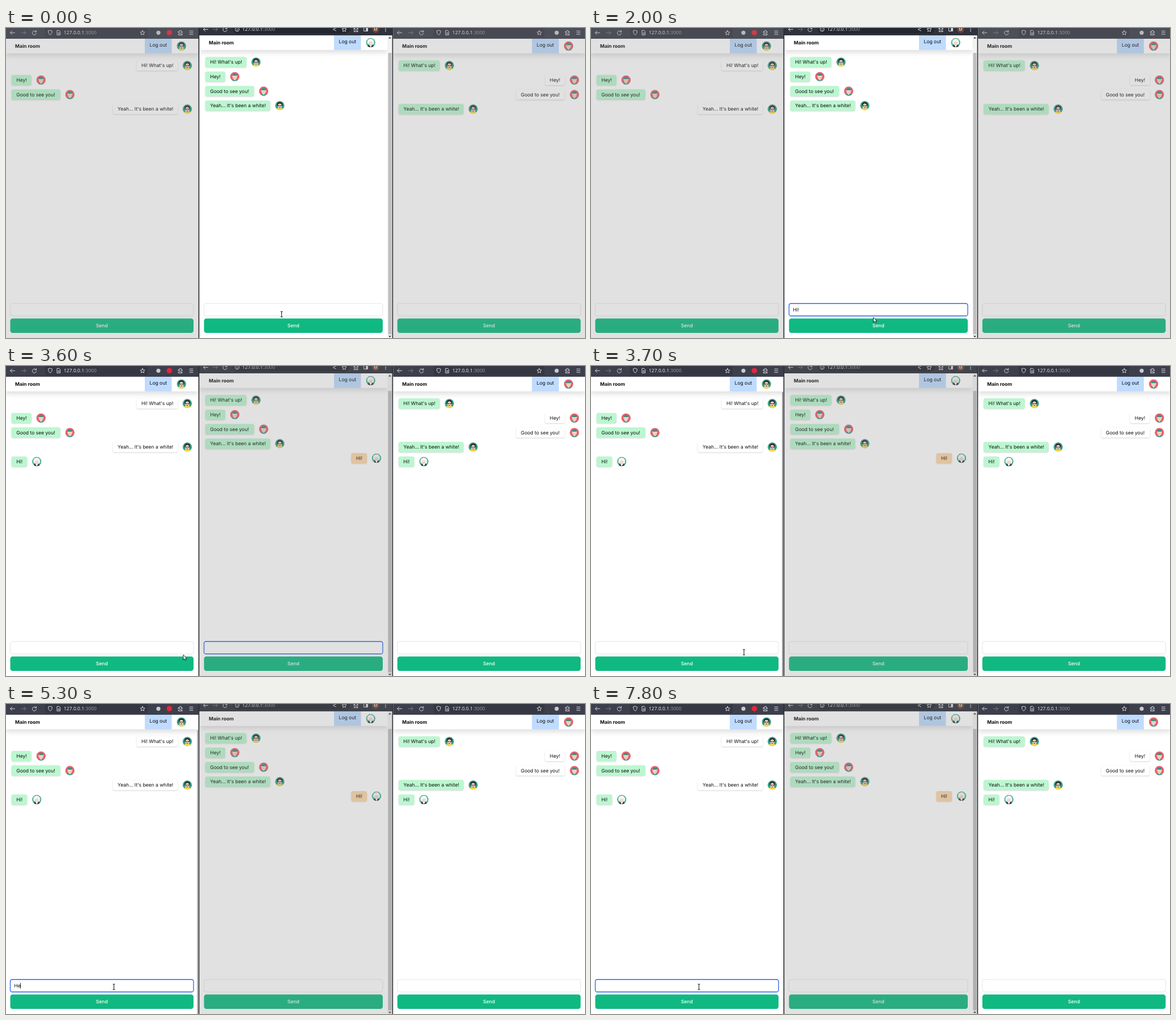
An HTML page for the animation above (8 s loop, 1022 px wide and 548 px high).

```html
<!DOCTYPE html>
<html lang="en">
<head>
<meta charset="utf-8">
<title>Chat in three windows</title>
<style>
  html, body { margin: 0; width: 100%; height: 100%; overflow: hidden; background: #fff; }
  svg { display: block; }
  text { font: 8.52px Inter, sans-serif; fill: #0b0b0b; text-rendering: geometricPrecision; white-space: pre; }
  .bold { font-weight: 700; }
  .mid { text-anchor: middle; }
  .url { font-family: "Noto Sans", sans-serif; fill: #e6e7ec; }
  .port { fill: #9698a2; }
  .icon { fill: none; stroke: #d3d4da; stroke-width: 1; stroke-linecap: round; stroke-linejoin: round; }
  .faint { stroke: #777984; }
  .bubble { filter: drop-shadow(0 1.6px 1.3px rgba(0,0,0,.17)); }
  .header { filter: drop-shadow(0 5px 4px rgba(0,0,0,.12)); }
</style>
</head>
<body>
<svg width="1022" height="548" viewBox="0 0 1022 548">
  <defs>
    <clipPath id="round"><circle r="8.3"/></clipPath>
    <g id="ann" clip-path="url(#round)">
      <circle r="8.3" fill="#35a38b"/>
      <path d="M-7 9Q-6 3.5 0 3.5T7 9Z" fill="#f6d63c"/>
      <path d="M-5 1Q-6-6.3 0-6.3T5 1Z" fill="#29262a"/>
      <ellipse cy=".8" rx="3.7" ry="4.6" fill="#ecd0bc"/>
      <path d="M-3.4-.6H-.5V1H-3ZM.5-.6H3.4L3 1H.5ZM-1.4 3H1.4V4H-1.4Z" fill="#39323a"/>
    </g>
    <g id="bob" clip-path="url(#round)">
      <circle r="8.3" fill="#e8626a"/>
      <path d="M-6 9Q-5 4 0 4T6 9Z" fill="#4a9d9a"/>
      <path d="M-2.4 3.5H2.4L0 7Z" fill="#f6eee8"/>
      <ellipse cy=".8" rx="3.8" ry="4.3" fill="#f1cdb5"/>
      <path d="M-4.4-.8Q-4.6-5.6 0-5.6T4.4-.8Z" fill="#3d8e8d"/>
      <path d="M-4.6-1.4H4.6V0H-4.6Z" fill="#f4e9e2"/>
    </g>
    <g id="cat" clip-path="url(#round)">
      <circle r="8.3" fill="#48b096"/>
      <path d="M-7 9Q-6 4 0 4T7 9Z" fill="#2d3035"/>
      <path d="M-2.5 4H2.5L0 8.5Z" fill="#fff"/>
      <path d="M-5.5 2.5L-6.3-1L-5-5L-1-6.8L3-6.3L5.7-3L6 1L4.6 3.4Z" fill="#f6f6f4"/>
      <ellipse cy="1" rx="3.2" ry="4" fill="#f1d8ca"/>
      <path d="M-4-1L-2-4.5H3L4-1L1-2Z" fill="#f6f6f4"/>
    </g>
    <path id="back" class="icon" d="M4 0H-4M-.8-3.2L-4 0L-.8 3.2"/>
    <path id="reload" class="icon" d="M3.1-1.6A3.6 3.6 0 1 0 3.6 1M3.5-4V-1.4H.9"/>
    <path id="star" class="icon" d="M0-4L1.2-1.3L4.1-1L1.9.9L2.5 3.8L0 2.3L-2.5 3.8L-1.9.9L-4.1-1L-1.2-1.3Z"/>
    <path id="puzzle" class="icon" d="M-3.6-2H-1.5A1.5 1.5 0 1 1 1.3-2H3V.2A1.5 1.5 0 1 0 3 2.2V4H-3.6V2A1.4 1.4 0 1 0-3.6-.2Z"/>
    <path id="menu" class="icon" d="M-3-3H3M-3 0H3M-3 3H3"/>
    <path id="shield" class="icon" d="M0-4.2L3.5-3Q3.7 2 0 4.2Q-3.7 2-3.5-3Z"/>
    <path id="page" class="icon" d="M-2.6-4H.8L2.6-2V4H-2.6ZM-1 .2H1M-1 2H1"/>
    <path id="arrow" d="M.4.6V9.4L2.5 7.5L4 10.6L5.6 9.9L4.2 6.9H7Z" fill="#fff" stroke="#111" stroke-width=".9"/>
    <g id="beam" fill="none">
      <path d="M-2-4.7H2M0-4.7V4.7M-2 4.7H2" stroke="#fff" stroke-width="2.2"/>
      <path d="M-2-4.7H2M0-4.7V4.7M-2 4.7H2" stroke="#222" stroke-width="1.1"/>
    </g>
  </defs>
  <g id="stage"></g>
</svg>
<script>
const stage = document.getElementById('stage');
const pen = document.createElement('canvas').getContext('2d');

// text, bubble width, sender
const chat = [
  ["Hi! What's up!", 72.5, 'ann'],
  ['Hey!', 35, 'bob'],
  ['Good to see you!', 86, 'bob'],
  ["Yeah... It's been a white!", 114.5, 'ann'],
  ['Hi!', 27.5, 'cat']
];

// page left, page top, page width, user, own bubble colour
const windows = [
  { x: 0, y: 19, w: 339.5, user: 'ann', own: '#fff' },
  { x: 342, y: 13, w: 331.5, user: 'cat', own: '#fed7aa' },
  { x: 683.3, y: 19, w: 339.5, user: 'bob', own: '#fff' }
];

// time, typed text, caret visible
const typing = [
  [[0, '', 0], [4200, '', 1], [4900, 'H', 1], [5100, 'He', 1], [5400, 'Hey', 1], [5900, 'Hey ', 1],
   [6000, 'Hey  ', 1], [6700, 'Hey  ', 0], [7000, 'Hey ', 1], [7200, 'Hey', 1], [7300, 'He', 1],
   [7500, 'H', 1], [7600, '', 1], [7800, '', 0]],
  [[0, '', 0], [200, '', 1], [800, '', 0], [900, 'H', 1], [1100, 'Hi', 1], [1400, 'Hi!', 1],
   [2000, 'Hi!', 0], [2900, '', 1], [3100, '', 0]],
  [[0, '', 0]]
];

// time, x, y, shape
const pointer = [
  [0, 486.5, 506, 'beam'], [400, 498, 511, 'arrow'], [3400, 492.5, 472, 'arrow'],
  [3600, 312.5, 510, 'arrow'], [3700, 270, 506, 'beam'], [3800, 230, 503, 'beam'],
  [3900, 203, 501, 'beam'], [4000, 190.5, 500, 'beam']
];

const at = (steps, t) => steps.findLast(s => s[0] <= t);
const use = (id, x, y, extra = '') => `<use href="#${id}" transform="translate(${x} ${y}) ${extra}"/>`;
const rect = (x, y, w, h, fill, extra = '') =>
  `<rect x="${x}" y="${y}" width="${w}" height="${h}" fill="${fill}" ${extra}/>`;
const text = (s, x, y, cls = '') => `<text x="${x}" y="${y}" class="${cls}">${s}</text>`;
const icon = (d, extra = '') => `<path class="icon ${extra}" d="${d}"/>`;
const address = (x, y) => text('127.0.0.1<tspan class="port">:3000</tspan>', x, y, 'url');

function sideBar(i, x) {
  const shift = i ? 2.5 : 0, end = i ? 267 : 250;
  let s = rect(x, 0, 340, 19, '#3d404c') + rect(x + 69 + shift, -4, end - 69 - shift, 20.5, '#353742', 'rx="2.5"');
  s += use('back', x + 11.5, 8.3) + `<g opacity=".4">${use('back', x + 31, 8.3, 'scale(-1 1)')}</g>`;
  s += use('reload', x + 50, 8.3) + use('shield', x + 78 + shift, 8.3) + use('page', x + 93 + shift, 8.3);
  s += address(x + 102 + shift, 11.2) + use('star', x + end - 9, 8.3);
  s += `<circle cx="${x + (i ? 288.7 : 269)}" cy="8.3" r="3.6" fill="#c9cad1"/>`;
  if (!i) s += '<circle cx="288.3" cy="8.2" r="4.8" fill="#e5263d"/>';
  return s + use('puzzle', x + 308, 8.3) + use('menu', x + 327, 8.3);
}

function middleBar() {
  return rect(341, 0, 341, 13, '#30333d') + rect(400, -9, 207, 19, '#242731', 'rx="9"')
    + use('back', 352.5, 2.5) + `<g opacity=".4">${use('back', 369.5, 2.5, 'scale(-1 1)')}</g>`
    + use('reload', 386.5, 2.5) + '<circle class="icon" cx="408" cy="2.5" r="3.5"/>' + icon('M408 2.5V4.3M408 .7V.8')
    + address(417, 5.4) + icon('M582.5 0L577 2.5L582.5 5') + use('star', 597, 2.5)
    + use('puzzle', 618, 2.5) + icon('M632-1H638.5V5.5H632Z') + rect(635.3, -1, 3.2, 6.5, '#d3d4da')
    + '<circle cx="652.5" cy="2.5" r="6" fill="#6d4639"/>'
    + '<text x="652.5" y="5" class="mid" style="font-size:7px;fill:#eee">M</text>'
    + [-.5, 2.5, 5.5].map(y => `<circle cx="670" cy="${y}" r=".9" fill="#d3d4da"/>`).join('');
}

function bubbles({ x, y, w, user, own }, count) {
  return chat.slice(0, count).map(([words, width, who], i) => {
    const mine = who === user, cy = y + 47.3 + i * 25.65;
    const left = mine ? x + w - 36.5 - width : x + 9.8;
    const face = mine ? x + w - 19.5 : left + width + 17;
    return rect(left, cy - 9, width, 18, mine ? own : '#bbf7d0', 'rx="3.2" class="bubble"')
      + text(words, left + 8.5, cy + 3) + use(who, face, cy);
  }).join('');
}

function form(i, { x, w }, t) {
  const [, words, caret] = at(typing[i], t);
  const focused = i === 1 ? t >= 200 && t < 3700 : i === 0 && t >= 4200;
  const left = x + 7.5, width = w - 16, start = x + 14.4;
  const line = focused ? 'stroke="#2563eb" stroke-width="1.3"' : 'stroke="#d6d9de" stroke-width=".7"';
  let s = rect(left, 487, width, 22, '#fff', `rx="3.6" ${line}`) + text(words, start, 501);
  if (caret) s += rect(Math.floor(start + pen.measureText(words).width), 493, 1, 10, '#222');
  return s + rect(left, 513.5, width, 25.5, '#10b981', 'rx="4.2"')
    + `<text x="${left + width / 2}" y="529.2" class="mid" style="fill:#fff;font-weight:500">Send</text>`;
}

function scrollbar(i, t) {
  if (i === 1) return rect(673.5, 13, 8.5, 535, '#f3f3f3') + rect(674.5, 44, 6, 497.5, '#bfbfbf')
    + '<path d="M675 18.5L677.5 15.5L680 18.5ZM675 544L677.5 547L680 544Z" fill="#444"/>';
  if (i || t < 3700 || t >= 5500) return '';
  const fade = t < 5300 ? 1 : t < 5400 ? .75 : .4;
  return rect(337.3, 46, 1.9, 502, '#8f8f92', `opacity="${fade}"`);
}

function windowView(win, i, t) {
  const { x, y, w, user } = win;
  const active = (i === 1) === (t < 3600);
  let s = rect(x - 1, y, w + 2, 548, '#fff') + (i === 1 ? middleBar() : sideBar(i, x));
  s += rect(x, y, w, 25.8, '#fff', 'class="header"') + text('Main room', x + 16, y + 16, 'bold');
  s += rect(x + w - 94.5, y, 47.5, 25.8, '#bfdbfe') + text('Log out', x + w - 70.7, y + 14.1, 'mid');
  s += use(user, x + w - 29.8, y + 12.8);
  s += bubbles(win, t < 2900 ? 4 : 5) + form(i, win, t) + scrollbar(i, t);
  if (!active) s += rect(x - 1, 0, i === 1 ? 342 : 341, 548, '#7f7f7f', 'opacity=".235"');
  return `<svg x="0" y="0" width="1022" height="548"><clipPath id="win${i}">${rect(x - 1, 0, i === 1 ? 342 : 341, 548, '#000')}</clipPath><g clip-path="url(#win${i})">${s}</g></svg>`;
}

function draw(t) {
  const [, px, py, shape] = at(pointer, t);
  pen.font = '8.52px Inter, sans-serif';
  stage.innerHTML = windows.map((win, i) => windowView(win, i, t)).join('')
    + rect(339.6, 0, 1.7, 548, '#2b2d34') + rect(681.6, 0, 1.6, 548, '#2b2d34')
    + use(shape, px, py);
}

const begin = performance.now();
let shown = -1;
function tick() {
  const t = Math.floor((performance.now() - begin) % 8000 / 100) * 100;
  if (t !== shown) draw(shown = t);
  requestAnimationFrame(tick);
}
tick();
</script>
</body>
</html>
```
